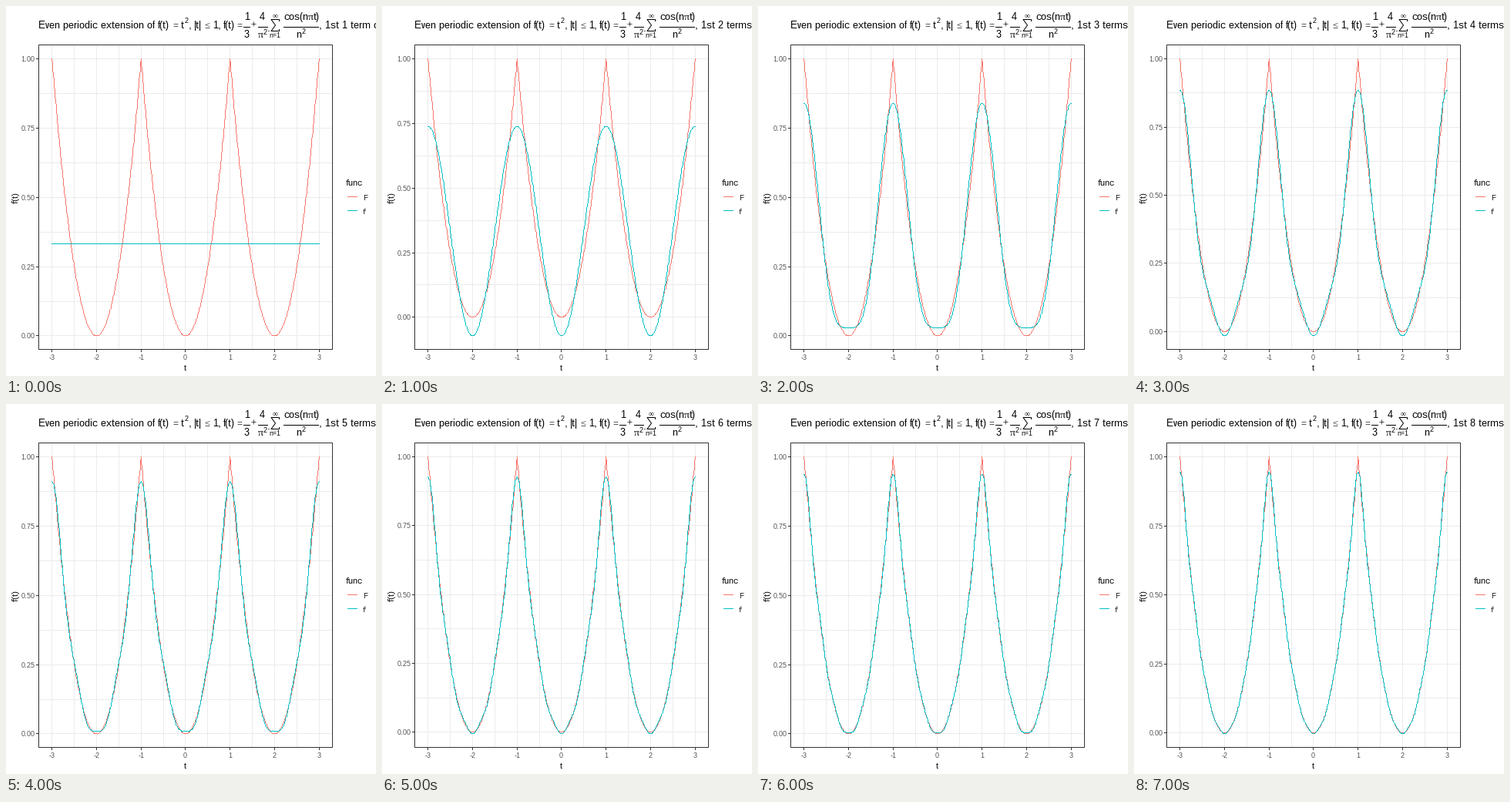
Recreate the animation shown at these times as a matplotlib script. Size 480 by 480 pixels, loop 8000 ms.

```python
import numpy as np
import matplotlib.pyplot as plt
from matplotlib.animation import FuncAnimation
from matplotlib.collections import PolyCollection
from matplotlib.patches import Rectangle

plt.rcParams.update({"text.hinting": "native", "text.hinting_factor": 1})

SIZE, DPI = 480, 72                # at 72 dpi one point is one pixel
LEFT, RIGHT, TOP, BOTTOM = 42, 423, 50.3, 445.4
SANS, SERIF = "Liberation Sans", "Liberation Serif"
RED, TEAL, GRID, DARK, GREY = "#F8766D", "#00BFC4", "#EBEBEB", "#333333", "#4D4D4D"

fig = plt.figure(figsize=(SIZE / DPI, SIZE / DPI), dpi=DPI, facecolor="white")
ax = fig.add_axes([0, 0, 1, 1])
ax.set_xlim(0, SIZE)
ax.set_ylim(SIZE, 0)
ax.axis("off")


def write(x, y, s, size=13, color="black", family=SANS, ha="left"):
    return ax.text(x, y, s, fontsize=size, color=color, family=family,
                   ha=ha, va="baseline")


def line(xs, ys, color, width=1.0, z=2):
    return ax.plot(xs, ys, color=color, lw=width, zorder=z, snap=False,
                   solid_capstyle="butt")[0]


def x_px(t):
    return np.rint(LEFT + (RIGHT - LEFT) * (0.05 + (t + 3) / 6) / 1.1)


def y_px(v, low):
    share = 0.05 + (v - low) / (1 - low)
    return np.rint(BOTTOM - (BOTTOM - TOP) * share / 1.1)


def partial_sum(terms):
    total = np.full_like(t, 1 / 3)
    for n in range(1, terms):
        total += 4 / np.pi**2 * (-1)**n * np.cos(n * np.pi * t) / n**2
    return total


def pixel_squares(xs, ys):
    """Unit squares along a polyline, one per step of its longer axis."""
    steps = np.maximum(abs(np.diff(xs)), abs(np.diff(ys)))
    at = np.concatenate([[0], np.cumsum(steps)])
    k = np.arange(at[-1] + 1)
    corner = np.rint(np.column_stack([np.interp(k, at, xs), np.interp(k, at, ys)]))
    unit = np.array([[0, 0], [1, 0], [1, 1], [0, 1]])
    return corner[:, None, :] + unit


def add_curve(color, z):
    return ax.add_collection(PolyCollection([], facecolors=color, linewidths=0,
                                            zorder=z), autolim=False)


t = np.linspace(-3, 3, 601)
parabola = (t - 2 * np.round(t / 2))**2


def draw_title():
    for x, s in [(42, "Even periodic extension of"), (197, "f(t)"), (227, "t"),
                 (237, ","), (244, "|t|"), (268, "1,"), (282, "f(t)"),
                 (406, ",")]:
        write(x, 29, s)
    for x, s in [(216, "="), (257, "≤"), (299, "="), (317.5, "+")]:
        write(x, 29, s, family=SERIF)
    write(232, 22, "2", 9)

    for x0, x1 in [(308, 317), (327, 340), (360, 406)]:
        line([x0, x1], [27.5, 27.5], "black")
    write(312.5, 18, "1", ha="center")
    write(312.5, 41, "3", ha="center")
    write(332.5, 18, "4", ha="center")
    write(326.5, 41, "π", family=SERIF)
    write(334, 37, "2", 9)
    write(339, 33, ".")

    # summation sign with its limits
    line([354.5, 354.5, 344, 349.5, 344, 354.5, 354.5],
         [20, 17.5, 17.5, 25, 32.5, 32.5, 30], "black")
    write(349, 16, "∞", 10, family=SERIF, ha="center")
    write(349, 41, "n=1", 9, ha="center")

    write(360, 18, "cos(n")
    write(391.5, 18, "π", family=SERIF)
    write(398.5, 18, "t)")
    write(376, 41, "n")
    write(383.5, 36, "2", 9)


def draw_frame():
    left, right, top, bottom = np.rint([LEFT, RIGHT, TOP, BOTTOM]) + 0.5
    for half in range(-6, 7):
        x = x_px(half / 2) + 0.5
        line([x, x], [top, bottom], GRID, z=1)
        if half % 2 == 0:
            line([x, x], [446, 449], DARK)
            write(x, 459, str(half // 2), 9, GREY, ha="center")
    ax.add_patch(Rectangle((left, top), right - left, bottom - top, fill=False,
                           ec=DARK, lw=1, zorder=5, snap=False))
    write(232, 473, "t", 11, ha="center")
    ax.text(17.5, 248, "f(t)", fontsize=11, family=SANS, rotation=90,
            ha="right", va="center")


def draw_legend():
    write(441, 233, "func", 11)
    for y, color, name in [(247.5, RED, "F"), (265.5, TEAL, "f")]:
        line([443, 456], [y, y], color)
        write(463, y + 4.5, name, 9)


draw_title()
draw_frame()
draw_legend()

levels = np.arange(-1, 9) / 8
grid = [line([LEFT, RIGHT], [0, 0], GRID, z=1) for _ in levels]
majors = levels[1::2]
ticks = [line([39, 42], [0, 0], DARK) for _ in majors]
labels = [write(37.5, 0, f"{v:.2f}", 9, GREY, ha="right") for v in majors]
curve_F = add_curve(RED, 3)
curve_f = add_curve(TEAL, 4)
count = write(413.5, 29, "")


def update(i):
    terms = i + 1
    f = partial_sum(terms)
    low = min(0, f.min())
    curve_F.set_verts(pixel_squares(x_px(t), y_px(parabola, low)))
    curve_f.set_verts(pixel_squares(x_px(t), y_px(f, low)))
    for v, g in zip(levels, grid):
        y = y_px(v, low)
        g.set_ydata([y + 0.5, y + 0.5])
        g.set_visible(y <= BOTTOM)
    for v, tick, label in zip(majors, ticks, labels):
        y = y_px(v, low)
        tick.set_ydata([y + 0.5, y + 0.5])
        label.set_y(y + 4)
    count.set_text("1st 1 term only" if terms == 1 else f"1st {terms} terms")
    return [curve_F, curve_f, count, *grid, *ticks, *labels]


anim = FuncAnimation(fig, update, frames=8, interval=1000, repeat=True,
                     repeat_delay=0, blit=False)
plt.show()
```
